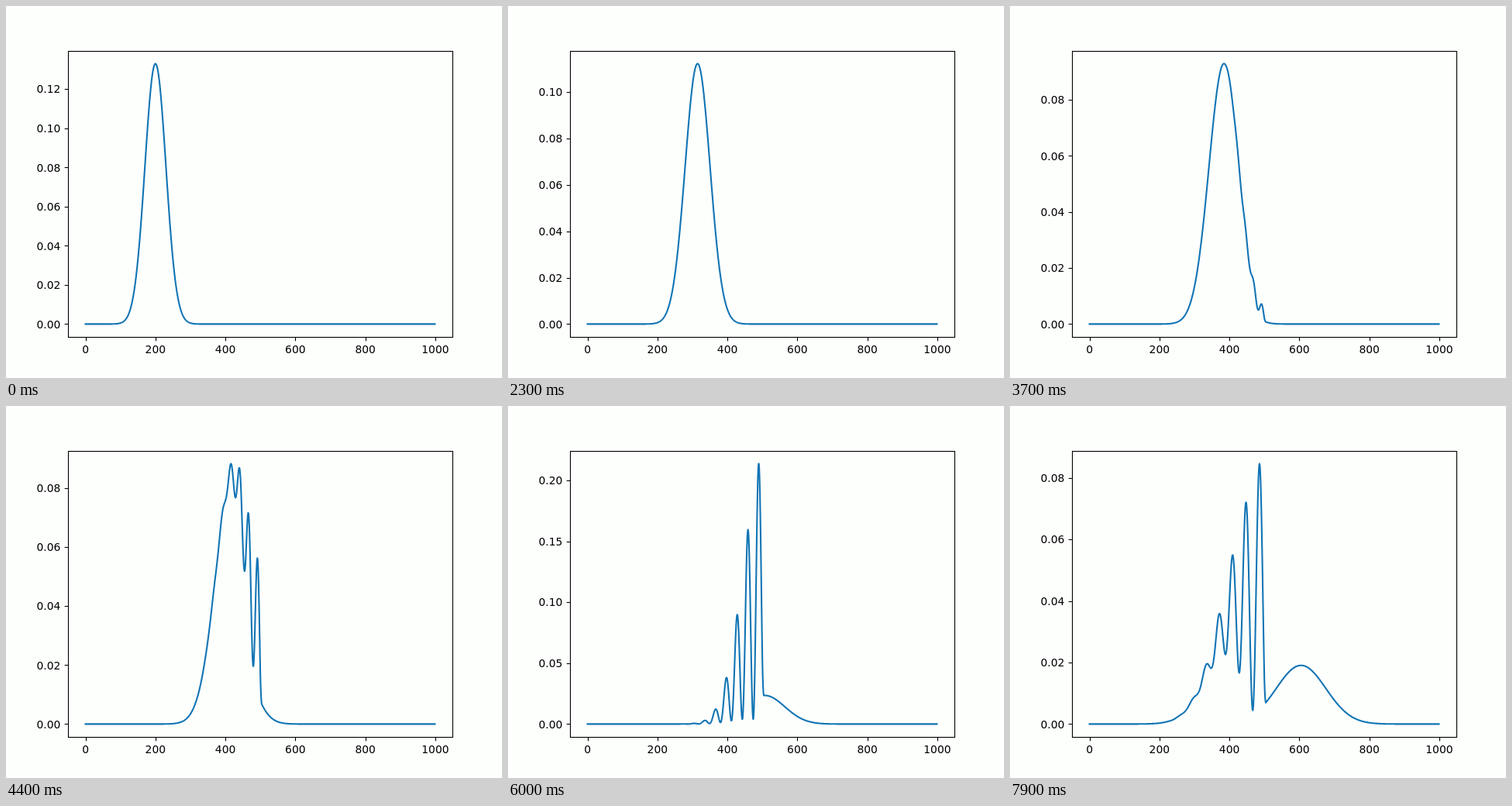
An HTML page for the animation above (8 s loop, 640 by 480 pixels).

```html
<!DOCTYPE html>
<html lang="en">
<head>
<meta charset="utf-8">
<title>Wave packet at a barrier</title>
<style>
  html, body { margin: 0; width: 100%; height: 100%; overflow: hidden; background: #fdfffd; }
  svg { display: block; width: 640px; height: 480px; }
  text { font: 13.89px "DejaVu Sans", sans-serif; fill: #000; }
  .axis { fill: none; stroke: #000; stroke-width: 1.11; }
  #curve { fill: none; stroke: #1174b4; stroke-width: 2.08; stroke-linejoin: round; stroke-linecap: square; }
</style>
</head>
<body>
<svg viewBox="0 0 640 480">
  <g id="xTicks"></g>
  <g id="yTicks"></g>
  <path id="curve"/>
  <rect class="axis" x="80.5" y="58.5" width="496" height="369"/>
</svg>
<script>
const FRAMES = 80, FRAME_MS = 100;
const LEFT = 102.545, WIDTH = 450.909, BASE = 410.4, HEIGHT = 336;

// Grid, packet and barrier, in units where hbar = m = 1
const N = 1000, DX = 0.1, SIGMA = 3, START = 20, K = 1;
const BARRIER = 2.4, FROM = 500, TO = 505;
const FRAME_TIME = 0.5, STEPS = 20;

// Crank-Nicolson: solve (1 + iH dt/2) y = psi, then psi <- 2y - psi
function simulate() {
  const array = () => new Float64Array(N);
  const half = FRAME_TIME / STEPS / 2, g = half / (2 * DX * DX);
  const re = array(), im = array(), yr = array(), yi = array();
  const mr = array(), mi = array(), cr = array(), ci = array();
  const norm = (2 * Math.PI * SIGMA ** 2) ** -0.25;

  for (let j = 0; j < N; j++) {
    const x = j * DX - START;
    const amp = norm * Math.exp(-x * x / (4 * SIGMA ** 2));
    re[j] = amp * Math.cos(K * x);
    im[j] = amp * Math.sin(K * x);

    const v = j >= FROM && j < TO ? BARRIER : 0;
    const dr = 1 - (j ? g * ci[j - 1] : 0);
    const di = 2 * g + half * v + (j ? g * cr[j - 1] : 0);
    const size = dr * dr + di * di;
    mr[j] = dr / size;
    mi[j] = -di / size;
    cr[j] = g * mi[j];
    ci[j] = -g * mr[j];
  }

  function step() {
    let pr = 0, pi = 0;
    for (let j = 0; j < N; j++) {
      const a = re[j] - g * pi, b = im[j] + g * pr;
      pr = yr[j] = a * mr[j] - b * mi[j];
      pi = yi[j] = a * mi[j] + b * mr[j];
    }
    pr = pi = 0;
    for (let j = N - 1; j >= 0; j--) {
      const a = yr[j] - (cr[j] * pr - ci[j] * pi);
      const b = yi[j] - (cr[j] * pi + ci[j] * pr);
      pr = a;
      pi = b;
      re[j] = 2 * a - re[j];
      im[j] = 2 * b - im[j];
    }
  }

  return Array.from({ length: FRAMES }, (_, f) => {
    if (f) for (let s = 0; s < STEPS; s++) step();
    return re.map((r, j) => r * r + im[j] * im[j]);
  });
}

const byId = id => document.getElementById(id);
const snap = v => Math.floor(v + 0.5) + 0.5;
const xAt = j => LEFT + WIDTH * j / (N - 1);

function xTick(value) {
  const x = xAt(value);
  return `<path class="axis" d="M${snap(x)} 428v4.36"/>` +
    `<text x="${x}" y="448" text-anchor="middle">${value}</text>`;
}

function yTick(y, label) {
  return `<path class="axis" d="M80 ${snap(y)}h-4.36"/>` +
    `<text x="70.3" y="${Math.round(y + 5.3)}" text-anchor="end">${label}</text>`;
}

// Tick spacing and the largest ninth of the axis it serves
const SPACINGS = [[0.02, 0.0197], [0.025, 0.025], [0.05, 0.05]];

function yTicks(max) {
  const [gap] = SPACINGS.find(([, limit]) => 1.1 * max / 9 <= limit);
  const digits = gap === 0.025 ? 3 : 2;
  let out = "";
  for (let i = 0; i * gap <= 1.05 * max; i++)
    out += yTick(BASE - HEIGHT * i * gap / max, (i * gap).toFixed(digits));
  return out;
}

const density = simulate();
let shown = -1;

function show(frame) {
  if (frame === shown) return;
  shown = frame;
  const d = density[frame], max = Math.max(...d);
  const points = Array.from(d, (v, j) =>
    xAt(j).toFixed(2) + " " + (BASE - HEIGHT * v / max).toFixed(2));
  byId("curve").setAttribute("d", "M" + points.join("L"));
  byId("yTicks").innerHTML = yTicks(max);
}

byId("xTicks").innerHTML = [0, 200, 400, 600, 800, 1000].map(xTick).join("");
show(0);

const start = performance.now();
function tick() {
  const time = Math.max(0, performance.now() - start);
  show(Math.floor(time / FRAME_MS) % FRAMES);
  requestAnimationFrame(tick);
}
requestAnimationFrame(tick);
</script>
</body>
</html>
```
